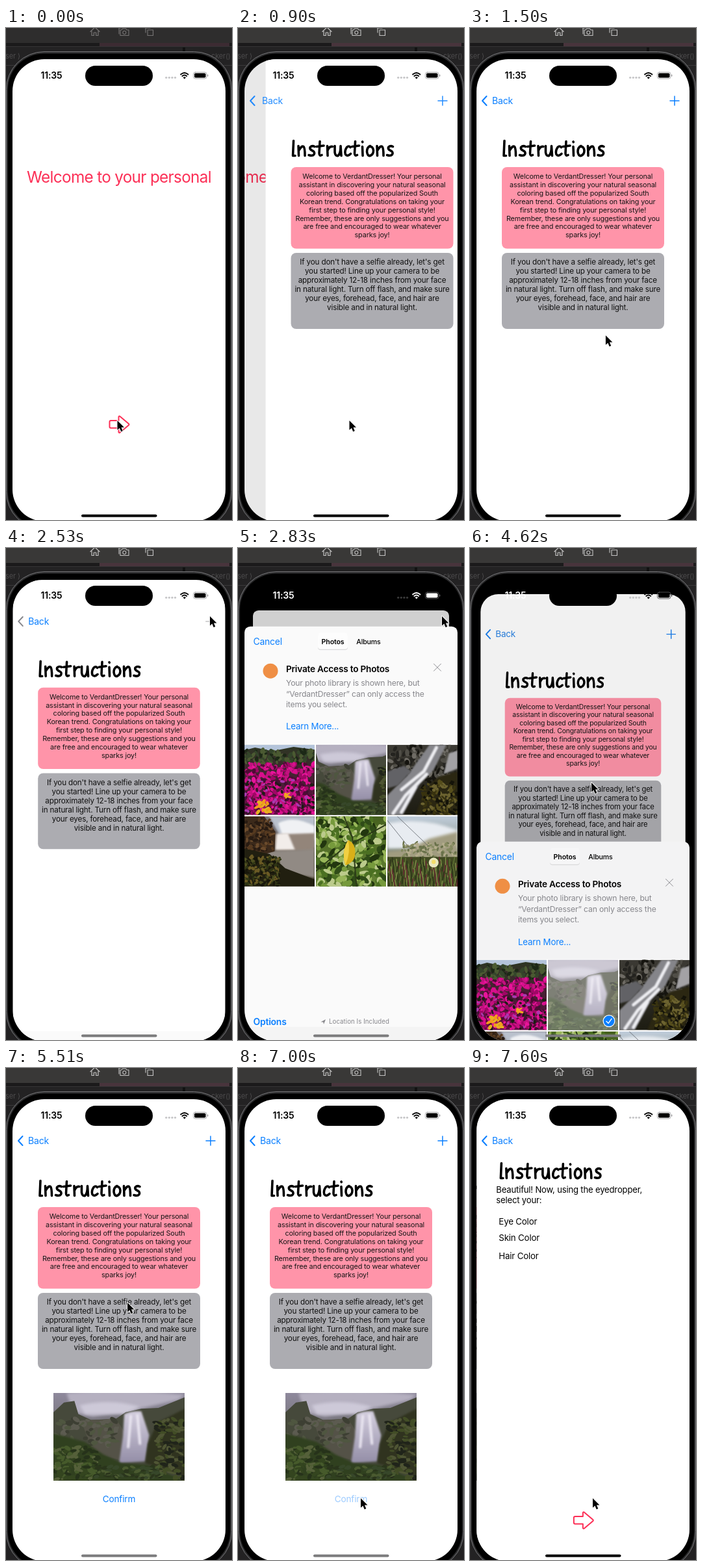
Write an HTML page with a canvas that moves like this. It is 348 px wide and 757 px high and loops after 8000 ms.

```html
<!DOCTYPE html>
<html lang="en">
<head>
<meta charset="utf-8">
<title>Style guide app</title>
<style>
html, body { margin: 0; width: 100%; height: 100%; overflow: hidden; background: #1f1e1f; }
canvas { display: block; width: 348px; height: 757px; }
</style>
</head>
<body>
<canvas id="stage" role="img" aria-label="Instructions for choosing a photo in a phone app"></canvas>
<script>
const W = 348, H = 757, LOOP = 8000;
const BLUE = '#0a7fff', PINK = '#fc2f56', GREY = '#87878c';
const canvas = document.getElementById('stage');
const c = canvas.getContext('2d');
const dpr = window.devicePixelRatio || 1;
canvas.width = W * dpr;
canvas.height = H * dpr;

const ticks = [0, 600, 750, 900, 1050, 1200, 1350, 1500, 1640, 1790, 1940, 2090, 2240, 2390,
  2530, 2680, 2830, 2980, 3130, 3280, 3570, 3720, 4620, 4770, 4920, 5060, 5510,
  6410, 6560, 6710, 6860, 7010, 7150, 7300, 7450, 7600];

// Remaining distance (1 to 0) of a critically damped spring.
function spring(t, start, w) {
  const x = Math.max(0, t - start) / 1000 * w;
  const r = (1 + x) * Math.exp(-x);
  return r < 0.001 ? 0 : r;
}
const clamp = v => Math.min(1, Math.max(0, v));
const ease = v => v * v * (3 - 2 * v);
const lerp = (a, b, k) => a + (b - a) * k;

function mix(a, b, k) {
  const part = (s, i) => parseInt(s.slice(i, i + 2), 16);
  return 'rgb(' + [1, 3, 5].map(i => Math.round(lerp(part(a, i), part(b, i), k))) + ')';
}

function rect(x, y, w, h, color) {
  c.fillStyle = color;
  c.fillRect(x, y, w, h);
}
function round(x, y, w, h, r, color) {
  c.beginPath();
  c.roundRect(x, y, w, h, r);
  if (color) { c.fillStyle = color; c.fill(); }
}
function disc(x, y, r, color) {
  c.beginPath();
  c.arc(x, y, r, 0, 7);
  c.fillStyle = color;
  c.fill();
}
function fill(d, color) {
  c.fillStyle = color;
  c.fill(new Path2D(d));
}
function stroke(d, color, width) {
  c.strokeStyle = color;
  c.lineWidth = width;
  c.lineCap = c.lineJoin = 'round';
  c.stroke(new Path2D(d));
}
function group(draw) {
  c.save();
  draw();
  c.restore();
}
function text(s, x, y, size, color, align = 'left', weight = 400, track = -0.014) {
  c.font = `${weight} ${size}px Inter, sans-serif`;
  c.letterSpacing = track * size + 'px';
  c.textAlign = align;
  c.fillStyle = color;
  c.fillText(s, x, y + size * 0.36);
}
function lines(rows, x, y, step, size, color, align) {
  rows.forEach((s, i) => text(s, x, y + i * step, size, color, align));
}

// Marker lettering for the heading; each letter starts at its own x.
const glyphs = {
  I: 'M4 -25L3 -2L6.500 -2',
  n: 'M2 -17L2.5 -2M2.5 -10Q7 -18 10 -16Q12 -14 12 -2',
  s: 'M10 -16Q6 -18 3 -15Q2 -12 6 -10Q11 -8 9 -4Q7 -1 1 -3',
  t: 'M6 -24L5 -6Q5 -1 9 -3M1 -16L12 -17.5',
  r: 'M2 -17L2.5 -2M2.5 -10Q5 -17 10 -16',
  u: 'M2 -17L2 -7Q3 -1 7 -2Q11 -5 11 -17L12 -2',
  c: 'M10.5 -15Q8 -18 5 -15Q1 -9 3 -4Q6 0 11 -5',
  i: 'M2 -16L2.5 -2M2 -23.5L2.3 -23',
  o: 'M7 -17Q2 -15 2 -8Q3 -1 7 -2Q12 -4 12 -10Q11 -17 6 -16'
};
const starts = [0, 9.5, 26.5, 38.5, 54, 65.5, 81, 93, 108, 115, 130.5, 147];
function heading(x, y) {
  [...'Instructions'].forEach((ch, i) => group(() => {
    c.translate(x + starts[i], y);
    stroke(glyphs[ch], '#000', 3.6);
  }));
}

// Photographs, drawn in a 100 x 100 space.
function specks(n, seed, colors, x, y, w, h, r) {
  const rnd = () => (seed = seed * 16807 % 2147483647) / 2147483647;
  for (let i = 0; i < n; i++) {
    c.fillStyle = colors[Math.floor(rnd() * colors.length)];
    c.beginPath();
    c.ellipse(x + rnd() * w, y + rnd() * h, r * (0.6 + rnd()), r * (0.4 + rnd() * 0.5), rnd() * 3, 0, 7);
    c.fill();
  }
}
function shade(top, bottom) {
  const g = c.createLinearGradient(0, 0, 0, 100);
  g.addColorStop(0, top);
  g.addColorStop(1, bottom);
  rect(0, 0, 100, 100, g);
}
function soft(radius, draw) {
  group(() => {
    c.filter = `blur(${radius}px)`;
    draw();
  });
}

function flowers() {
  shade('#2b3722', '#650a45');
  fill('M0 0H100V7L70 3L40 9L15 4L0 8Z', '#b4c4da');
  specks(90, 11, ['#1c2816', '#4b5a32', '#34452a'], 0, 8, 100, 18, 3.5);
  specks(420, 5, ['#d80f8d', '#a00766', '#e8149a', '#4f0a35', '#c3107f'], 0, 27, 100, 72, 3.2);
  specks(80, 8, ['#1d1d14', '#3f1232', '#a83bb0'], 0, 50, 100, 50, 2.6);
  specks(20, 21, ['#f39a1c', '#e8b021'], 18, 80, 20, 17, 3);
  specks(6, 4, ['#f0a520'], 58, 70, 8, 6, 2.5);
}
function waterfall() {
  shade('#8f899c', '#4c5142');
  soft(2, () => {
    fill('M10 0Q50 -6 100 2L95 8L60 20L30 27L15 22Z', '#b5b0c0');
    fill('M20 14Q45 6 66 16L54 24H24Z', '#cdc9d8');
  });
  soft(0.7, () => {
    fill('M0 22L8 11L16 9L19 24L29 31L48 29L55 22L67 18L80 17L100 5V100H0Z', '#46493b');
    fill('M21 31L48 30L54 44L54 78L30 68Z', '#545247');
  });
  specks(70, 41, ['#4f5640', '#3d3f33', '#5c5b50'], 3, 30, 46, 30, 3);
  soft(1.5, () => {
    const water = c.createLinearGradient(0, 20, 0, 80);
    water.addColorStop(0, '#d5d0e0');
    water.addColorStop(1, '#938da6');
    fill('M54 24Q60 20 67 21L73 48L70 78L50 80L53 50Z', water);
    stroke('M59 26L57 62M64 25L66 58', '#e9e5f0', 2);
    fill('M0 46L24 56L38 70L52 80L72 82L100 100H0Z', '#30401f');
    fill('M100 18L79 34L72 58L70 80L100 95Z', '#30331f');
  });
  specks(150, 17, ['#465a2b', '#26321a', '#55603a', '#34451f'], 0, 62, 34, 38, 2.4);
  specks(110, 31, ['#424d26', '#20241a', '#4f5534'], 78, 30, 22, 68, 2.4);
  specks(70, 13, ['#4a5a30', '#37472a', '#2a351c'], 32, 84, 50, 14, 2.4);
}
function cascade() {
  shade('#3c3a34', '#1d1c12');
  specks(150, 9, ['#504e47', '#24231f', '#6e6b64', '#15140f'], 0, 0, 100, 50, 4);
  soft(1, () => {
    fill('M60 0L84 0L66 36L46 56L22 100H0V72L30 42Z', '#85858a');
    fill('M0 38L24 30L34 38L15 58L0 62Z', '#626266');
    fill('M88 12L100 8V34L80 42Z', '#a3a2a5');
    stroke('M70 4L52 38L20 64M56 42L26 72L8 98M40 60L20 96', '#eeeef2', 4.5);
    fill('M100 38L72 46L54 62L40 100H100Z', '#2b2712');
  });
  specks(130, 14, ['#554d1c', '#141309', '#6c6330', '#39330f'], 48, 52, 52, 48, 2.8);
}
function sunset() {
  shade('#77727a', '#3a341f');
  soft(1.5, () => {
    fill('M35 0H100V45H60Z', '#b9c0cc');
    fill('M48 10Q70 -2 100 14V34L55 30Z', '#f0f1f4');
    fill('M42 26L100 24V50H45Z', '#93857a');
    fill('M46 25L62 24L72 48H44Z', '#f2edea');
    fill('M30 50L100 47V88L62 80Z', '#918a84');
  });
  fill('M0 0H28L44 22L43 50L0 62Z', '#3c2a1b');
  specks(110, 6, ['#55391f', '#281b12', '#6b4b2c'], 0, 4, 40, 46, 2.8);
  fill('M0 46L36 54L58 74L100 90V100H0Z', '#211f10');
  specks(190, 19, ['#4c4e20', '#17160a', '#6a5a24', '#2f3514'], 0, 58, 50, 40, 2.6);
}
function leaves() {
  shade('#46611f', '#668436');
  specks(330, 23, ['#769a3c', '#304c18', '#98b659', '#bccb8c', '#4b7022', '#22360f'], 0, 0, 100, 100, 5);
  stroke('M0 78L40 45L100 12M58 100L52 30L40 0', '#2c3a18', 1.8);
  fill('M46 34Q56 38 56 52Q56 66 42 70Q36 50 46 34Z', '#d9b018');
  fill('M46 34Q50 50 42 70Q36 50 46 34Z', '#f0d043');
}
function dune() {
  shade('#c0cddb', '#444a22');
  soft(2, () => {
    fill('M0 10Q50 0 100 20V46H0Z', '#e8ecf1');
    fill('M0 50L30 47L60 32L100 22V66H0Z', '#a19c80');
  });
  specks(110, 3, ['#69714a', '#858a60', '#b4ad8c'], 20, 38, 80, 22, 2.6);
  rect(0, 58, 100, 42, '#414a22');
  for (let i = 0; i < 170; i++) {
    const x = i * 37 % 103, y = 68 + i * 53 % 41;
    stroke(`M${x} ${y}l${i % 5 - 2} -10`, ['#5f7434', '#6e2935', '#2b3418', '#83904a'][i % 4], 1.3);
  }
  stroke('M0 6L32 46M14 0L58 42', '#555b62', 0.7);
  disc(66, 66, 7, '#e9e7c0');
  disc(66, 65, 3, '#f2dc6b');
}
function photo(draw, x, y, w, h, imgW = w) {
  group(() => {
    c.beginPath();
    c.rect(x, y, w, h);
    c.clip();
    c.translate(x - (imgW - w) / 2, y);
    c.scale(imgW / 100, h / 100);
    draw();
  });
}

function arrow(y) {
  stroke(`M161.500 ${y - 6}H173.500V${y - 12}Q174.500 ${y - 13.500} 176 ${y - 12}L189 ${y - 1}Q190 ${y} 189 ${y + 1}` +
    `L176 ${y + 12}Q174.500 ${y + 13.500} 173.500 ${y + 12}V${y + 5.500}H161.500Q159.500 ${y + 5.500} 159.500 ${y + 3.500}` +
    `V${y - 4}Q159.500 ${y - 6} 161.500 ${y - 6}Z`, PINK, 2);
}

function welcomePage(t) {
  rect(10, 48, 328, 711, '#fff');
  text('Welcome to your personal', 174, 229, 24.3, PINK, 'center', 400, -0.028);
  group(() => {
    if (t >= 600) c.globalAlpha = 0.3;
    arrow(610);
  });
}

const intro = ['Welcome to VerdantDresser! Your personal', 'assistant in discovering your natural seasonal',
  'coloring based off the popularized South', 'Korean trend. Congratulations on taking your',
  'first step to finding your personal style!', 'Remember, these are only suggestions and you',
  'are free and encouraged to wear whatever', 'sparks joy!'];
const selfie = ["If you don't have a selfie already, let's get", 'you started! Line up your camera to be',
  'approximately 12-18 inches from your face', 'in natural light. Turn off flash, and make sure',
  'your eyes, forehead, face, and hair are', 'visible and in natural light.'];

function guidePage(t) {
  rect(10, 48, 328, 711, '#fff');
  heading(49, 198.5);
  round(49, 214, 250, 125.5, 8, '#ff94a9');
  lines(intro, 174, 228, 12.93, 10.85, '#151515', 'center');
  round(49, 346, 250, 117, 8, '#acacb1');
  lines(selfie, 174, 360, 14, 11.7, '#101010', 'center');
  if (t >= 5510) {
    photo(waterfall, 73, 500, 202, 135);
    text('Confirm', 174, 663, 13.6, t >= 6860 ? '#9ccbff' : BLUE, 'center');
  }
}

function colorPage() {
  rect(10, 48, 328, 711, '#fff');
  heading(44, 171.5);
  lines(['Beautiful! Now, using the eyedropper,', 'select your:'], 40, 187.5, 16, 13.1, '#000');
  ['Eye Color', 'Skin Color', 'Hair Color'].forEach((s, i) => text(s, 44, [236, 261, 289][i], 13.3, '#000'));
  arrow(696);
}

function push(from, to, left) {
  group(() => {
    c.translate(-0.3 * 328 * (1 - left), 0);
    from();
  });
  rect(10, 48, 328, 711, `rgba(0,0,0,${0.1 * (1 - left)})`);
  group(() => {
    c.translate(328 * left, 0);
    to();
  });
}

function navBar(alpha, plusAlpha, shift, tint, accent) {
  c.globalAlpha = alpha;
  stroke('M25.500 105L19 112L25.500 119', accent, 2);
  text('Back', 34 + shift, 112, 14, tint);
  c.globalAlpha = plusAlpha;
  stroke('M308 112H322M315 105V119', accent, 1.5);
  c.globalAlpha = 1;
}

function sheet(top, picked) {
  c.save();
  c.translate(0, top);
  round(10, 0, 328, 720, [9, 9, 0, 0], picked ? '#f3f3f4' : '#fafafa');
  text('Cancel', 23.5, 23.5, 13.9, BLUE);
  round(123, 11, 46, 25, 4, '#d2d2d4');
  round(123, 10, 46, 25, 4, picked ? '#f6f6f7' : '#fdfdfd');
  text('Photos', 146, 23, 10.6, '#000', 'center', 600);
  text('Albums', 201, 23, 10.6, '#000', 'center', 500);
  disc(50, 68.5, 11.5, '#ef8f45');
  text('Private Access to Photos', 74, 65.5, 13.6, '#000', 'left', 600);
  stroke('M301.500 57.500L312.500 68.500M312.500 57.500L301.500 68.500', '#8e8e93', 1);
  lines(['Your photo library is shown here, but', '“VerdantDresser” can only access the', 'items you select.'],
    74, 87, 16.5, 12.2, GREY);
  text('Learn More...', 74, 154, 13.3, BLUE);
  rect(10, 181, 328, 219, '#fff');
  [flowers, waterfall, cascade, sunset, leaves, dune].forEach((draw, i) =>
    photo(draw, 10 + i % 3 * 110, 182 + Math.floor(i / 3) * 110, 108, 108, i === 1 ? 161 : 108));
  if (picked) {
    rect(120, 182, 108, 108, 'rgba(255,255,255,.3)');
    disc(214, 276, 9.5, '#fff');
    disc(214, 276, 8.3, BLUE);
    stroke('M210 276.500L213 279.500L218 272.500', '#fff', 1.4);
  }
  rect(10, 616, 328, 104, '#f4f4f4');
  text('Options', 23.5, 608.5, 13.9, BLUE, 'left', 600);
  fill('M127.500 608.500L135 604.500L132 612L131.300 608.800Z', GREY);
  text('Location Is Included', 140, 608, 9.7, GREY, 'left', 400, 0.005);
  c.restore();
}

function statusBar(p) {
  round(122, 58, 104, 31, 15.5, '#000');
  text('11:35', 70, 73, 14, p > 0.4 ? '#fff' : '#000', 'center', 600);
  const ink = p > 0.6 ? '#fff' : '#000';
  for (let i = 0; i < 4; i++) disc(246.7 + i * 4.6, 76.3, 1.6, p > 0.6 ? '#3a3a3a' : '#c6c6c8');
  stroke('M269 71.500Q274.800 66.500 280.500 71.500M271.300 74Q274.800 71 278.300 74', ink, 1.8);
  fill('M274.800 78.500L272.500 76Q274.800 74.500 277.100 76Z', ink);
  c.strokeStyle = p > 0.4 ? '#555557' : '#a5a5a7';
  c.lineWidth = 0.9;
  round(288.5, 68, 20.5, 10, 3);
  c.stroke();
  round(290, 69.5, 17.5, 7, 1.8, ink);
  round(310, 71.5, 1.4, 3.2, 0.7, c.strokeStyle);
}

function desktop(active) {
  rect(0, 0, W, H, '#232223');
  rect(0, 0, W, 23, active ? '#393837' : '#2e2d2d');
  rect(0, 23, W, 5, '#1b1a1b');
  rect(144, 23, 200, 5, active ? '#48343c' : '#3c2b32');
  rect(0, 28, W, 1, '#353435');
  rect(272, 30, 4, 16, '#111');
  const icon = active ? '#c4c3c3' : '#777575';
  stroke('M130 5.500L137 -1L144 5.500M132 5V11.500H135.300V7H138.700V11.500H142V5', icon, 1.2);
  stroke('M176 3H178L179.500 1H184.500L186 3H189V11.500H176ZM174 9V0H177', icon, 1.1);
  stroke('M179.800 7a2.500 2.500 0 1 0 5 0a2.500 2.500 0 1 0 -5 0', icon, 1.1);
  stroke('M218 3H226.500V11.500H218ZM215 7V0H222', icon, 1.1);
  text('ser ⟩', -1, 43, 11, '#4c4b4c');
  text('cker()', 316, 43, 11, '#4c4b4c');
  rect(0, 57, W, 1, '#3a393a');
}
function device() {
  round(0.5, 36.5, 347, 735, 58, '#2c2c2d');
  c.strokeStyle = '#77777a';
  c.lineWidth = 1;
  c.stroke();
  round(3, 39.5, 342, 729, 55, '#000');
}

function cursor(t) {
  // [start, end, x, y]: each leg begins where the last one stopped.
  const legs = [[1050, 2390, 314, 105], [2830, 3280, 183, 370], [3280, 3720, 187, 361], [6260, 6860, 189, 662]];
  let x = 171.5, y = 604;
  for (const [a, b, x2, y2] of legs) {
    const k = ease(clamp((t - a) / (b - a)));
    x = lerp(x, x2, k);
    y = lerp(y, y2, k);
  }
  group(() => {
    c.translate(x, y);
    const shape = 'M0 0V14.500L3.400 11.500L5.700 17L8.300 16L6 10.500H10.500Z';
    stroke(shape, '#fff', 1.8);
    fill(shape, '#000');
  });
}

function screen(t) {
  const first = spring(t, 640, 15), second = spring(t, 6990, 15);
  const p = t < 4500 ? 1 - spring(t, 2518, 18.5) : spring(t, 4501.5, 15);
  group(() => {
    round(10, 48, 328, 711, 49);
    c.clip();
    rect(10, 48, 328, 711, '#000');
    group(() => {
      c.translate(174, 48 + 49 * p);
      c.scale(1 - 0.08 * p, 1 - 0.08 * p);
      c.translate(-174, -48);
      if (p > 0) {
        round(10, 48, 328, 711, lerp(46, 9, p));
        c.clip();
      }
      if (first > 0) push(() => welcomePage(t), () => guidePage(t), first);
      else if (second < 1) push(() => guidePage(t), colorPage, second);
      else guidePage(t);
      const pressed = t >= 2390 && t < 2830;
      navBar(1 - first, (1 - first) * second * (pressed ? 0.5 : 1), 31 * first,
        mix(BLUE, GREY, p * 0.5), pressed ? GREY : mix(BLUE, GREY, p * 0.3));
      if (p > 0) rect(10, 48, 328, 711, `rgba(0,0,0,${0.19 * p ** 1.6})`);
    });
    statusBar(p);
    if (p > 0) sheet(757 - 650 * p, t >= 4500);
    round(116, 748.5, 116.5, 4, 2, t >= 2530 && t < 7150 ? '#7b7b7c' : '#000');
  });
}

function render(t) {
  c.setTransform(dpr, 0, 0, dpr, 0, 0);
  desktop(t >= 600);
  device();
  screen(t);
  cursor(t);
}

let shown = -1;
function frame() {
  const now = performance.now() % LOOP;
  const t = ticks.filter(v => v <= now).pop();
  if (t !== shown) render(shown = t);
  requestAnimationFrame(frame);
}
frame();
</script>
</body>
</html>
```
